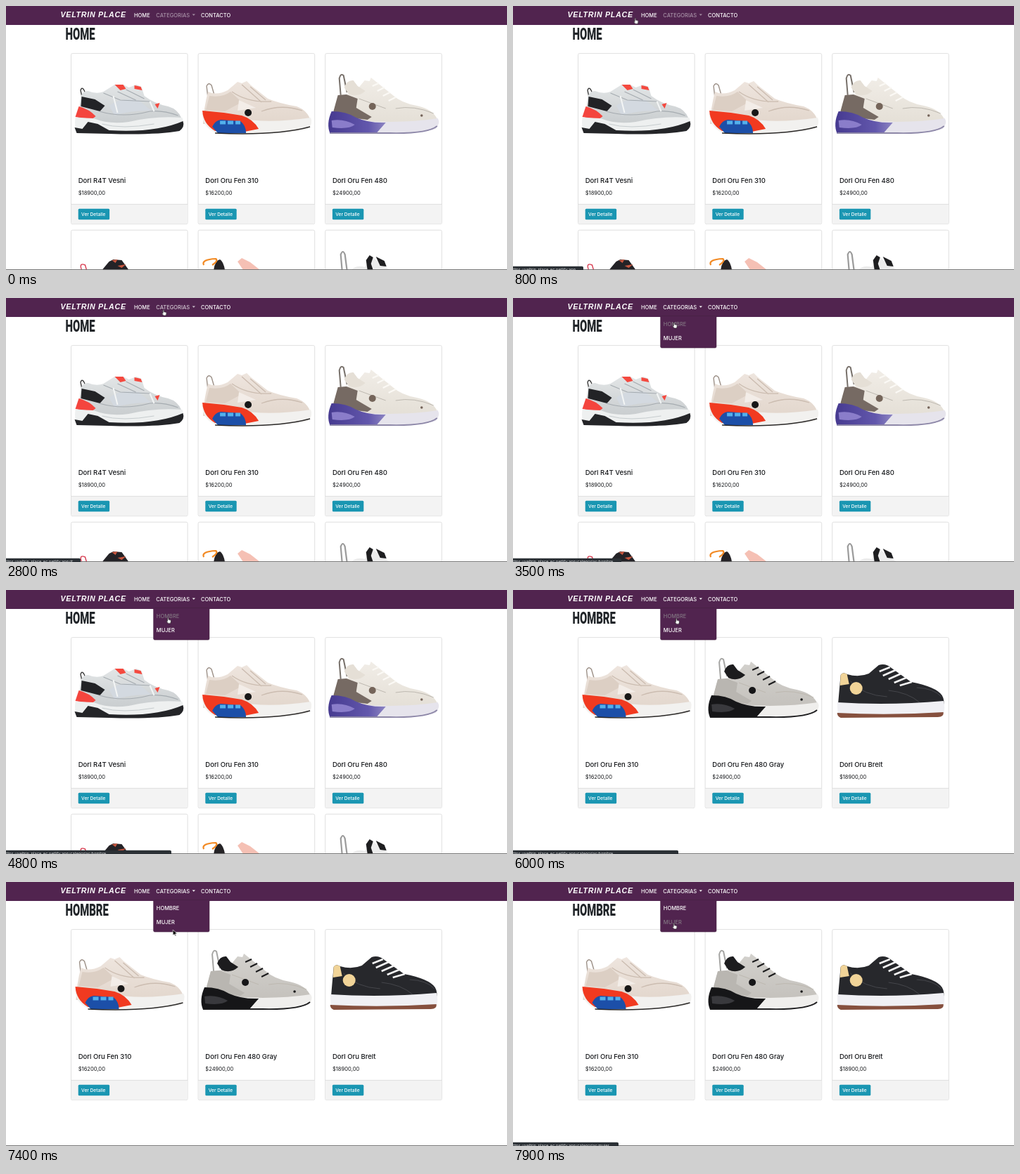
Write an HTML page that moves like this. It is 712 px wide and 376 px high and loops after 8 s.

```html
<!DOCTYPE html>
<html lang="es">
<head>
<meta charset="utf-8">
<title>Veltrin Place</title>
<style>
html, body { margin: 0; width: 100%; height: 100%; overflow: hidden; background: #fff; }
svg { display: block; width: 712px; height: 376px; }
text { font: 7.6px Inter, "Open Sans", sans-serif; fill: #15171a; }

/* page */
.nav text { fill: #fff; font-weight: 500; font-size: 7.5px; }
.nav .brand { font: italic 700 10.7px "Liberation Sans", Arial, sans-serif; letter-spacing: .7px; }
.heading { font: 900 24px Roboto, sans-serif; fill: #212529; transform: translate(84.5px, 48.2px) scaleX(.62); }
.title { font-size: 9.5px; font-weight: 500; }
.button { font-size: 6.6px; font-weight: 500; fill: #fff; }
.card { fill: #fff; stroke: #d9d9d9; stroke-width: .8; }
.url { font-size: 5.7px; fill: #d4d6d8; }
.bar { fill: #2b3035; }

/* every state shares one 8 s clock; 1.25% is 100 ms */
.run { animation: 8s step-end infinite; }
#home { animation-name: home; }
#men { animation-name: men; }
#categories { animation-name: categories; }
#menu { animation-name: menu; }
#hombre { animation-name: hombre; }
#mujer { animation-name: mujer; }
#cursor { animation-name: move; }
#hand { animation-name: hand; }
#arrow { animation-name: arrow; }
#url1 { animation-name: url1; }
#url2 { animation-name: url2; }
#url3 { animation-name: url3; }
#url4 { animation-name: url4; }
#grow { animation-name: grow; }

@keyframes home { 0% { opacity: 1 } 75%, 100% { opacity: 0 } }
@keyframes men { 0% { opacity: 0 } 75%, 100% { opacity: 1 } }
@keyframes categories {
  0% { fill-opacity: .5 } 28.75% { fill-opacity: .75 } 36.25%, 100% { fill-opacity: 1 }
}
@keyframes menu { 0% { opacity: 0 } 36.25%, 100% { opacity: 1 } }
@keyframes hombre { 0% { fill: #fff } 42.5% { fill: #827682 } 76.25%, 100% { fill: #fff } }
@keyframes mujer { 0% { fill: #fff } 93.75%, 100% { fill: #827682 } }
@keyframes move {
  0% { transform: translate(161px, 16.5px) }
  6.25% { transform: translate(167px, 16.5px) }
  10% { transform: translate(167px, 16.5px); animation-timing-function: steps(6, start) }
  17.5% { transform: translate(188px, 16px) }
  26.25% { transform: translate(188px, 16px); animation-timing-function: steps(5, start) }
  32.5% { transform: translate(220.5px, 16px) }
  40% { transform: translate(220.5px, 16px); animation-timing-function: steps(5, start) }
  46.25% { transform: translate(227px, 38.5px) }
  75% { transform: translate(229px, 39.5px) }
  76.25% { transform: translate(268px, 86px) }
  77.5% { transform: translate(314px, 134px) }
  83.75% { transform: translate(312px, 133px) }
  85% { transform: translate(308px, 128px) }
  86.25% { transform: translate(308px, 128px); animation-timing-function: steps(7, start) }
  95%, 100% { transform: translate(225.5px, 58px) }
}
@keyframes hand {
  0% { opacity: 0 } 5% { opacity: 1 } 76.25% { opacity: 0 } 93.75%, 100% { opacity: 1 }
}
@keyframes arrow { 0% { opacity: 0 } 76.25% { opacity: 1 } 93.75%, 100% { opacity: 0 } }
@keyframes url1 { 0% { opacity: 0 } 5% { opacity: .5 } 6.25% { opacity: 1 } 28.75%, 100% { opacity: 0 } }
@keyframes url2 { 0% { opacity: 0 } 28.75% { opacity: 1 } 42.5%, 100% { opacity: 0 } }
@keyframes url3 { 0% { opacity: 0 } 42.5% { opacity: 1 } 80% { opacity: .5 } 81.25%, 100% { opacity: 0 } }
@keyframes url4 { 0% { opacity: 0 } 97.5% { opacity: .5 } 98.75%, 100% { opacity: 1 } }
@keyframes grow { 0% { width: 156px } 58.75% { width: 196px } 60%, 100% { width: 237px } }
</style>
</head>
<body>
<svg viewBox="0 0 712 376">
<defs>
  <linearGradient id="silver" x2="0" y2="1"><stop stop-color="#e2e5e6"/><stop offset="1" stop-color="#c9cdcf"/></linearGradient>
  <linearGradient id="cream" x2="0" y2="1"><stop stop-color="#eee5de"/><stop offset="1" stop-color="#e2d6cc"/></linearGradient>
  <linearGradient id="ivory" x2="0" y2="1"><stop stop-color="#f1ede7"/><stop offset="1" stop-color="#e4dfd6"/></linearGradient>
  <linearGradient id="gray" x2="0" y2="1"><stop stop-color="#d3d1cd"/><stop offset="1" stop-color="#c4c1bc"/></linearGradient>
  <linearGradient id="violet"><stop stop-color="#463a90"/><stop offset=".7" stop-color="#6257ac"/><stop offset="1" stop-color="#8d85c2"/></linearGradient>

  <g id="chunky" fill="none">
    <path d="M16 132L13.500 120Q15 115 18 119L22 128" stroke="#333" stroke-width="1.3"/>
    <path d="M14 128Q17 121 24 121Q36 126 46 122L62 112L74 112L82 116L93 112L100 115L104 128Q118 139 138 143Q152 147 157 160L158 168L9 168Q12 144 14 128Z" fill="url(#silver)"/>
    <path d="M62 112L74 112L78 118L70 120ZM90 113L99 115L101 120L90 118ZM119 140L126 138L123 146Z" fill="#f4493f"/>
    <path d="M15 129L34 133L48 142L41 150L14 143Z" fill="#222326"/>
    <path d="M11 143Q26 147 35 157L30 161L6 158Z" fill="#f4453e"/>
    <path d="M54 142Q70 130 96 134L114 149Q86 148 62 156Z" fill="#d3d9e0"/>
    <path d="M46 124L70 134L112 136M66 122L92 134M78 119L104 132M40 150Q74 160 112 150Q130 148 152 156" stroke="#a5abb0" stroke-width="1.2"/>
    <path d="M60 128L66 152M112 136L118 150" stroke="#f3f5f5" stroke-width="2"/>
    <path d="M6 159L32 160Q54 169 82 165Q120 156 158 159Q162 169 154 176Q128 181 90 181L10 181Q4 174 6 159Z" fill="#eef0f0"/>
    <path d="M5 173L16 175L24 165L38 168L54 177Q120 181 159 164Q162 172 154 178Q120 184 54 182L8 181Z" fill="#242528"/>
    <path d="M44 168Q72 176 118 168" stroke="#c6ccce"/>
  </g>

  <g id="runner" fill="none">
    <path d="M14 132L12 114Q15 108 19 113L23 127" stroke="#9b8f86" stroke-width="1.4"/>
    <path d="M14 122Q26 128 42 120L56 108L62 110L69 107L75 113L99 132Q116 139 140 143Q156 149 160 164L158 170L7 168Q8 144 14 122Z" fill="url(#cream)"/>
    <path d="M16 128Q34 131 46 122L62 137L38 150L11 148Z" fill="#dccfc4"/>
    <path d="M48 122Q70 138 104 136M62 112L90 137M74 115L96 134M90 150Q118 139 148 149" stroke="#cbbcb0" stroke-width="1.3"/>
    <path d="M58 134L82 145L56 149Z" fill="#f3ede8"/>
    <path d="M6 153Q30 152 58 160Q100 168 160 159Q164 168 155 176Q120 182 70 181L24 180Q6 172 6 153Z" fill="#f2f1ef"/>
    <path d="M6 149Q34 151 62 156Q78 161 86 175L66 179L24 178Q7 168 6 149Z" fill="#f13a20"/>
    <path d="M20 172Q24 163 32 162L60 164Q68 170 68 181L28 181Z" fill="#1c4fa8"/>
    <path d="M31 166H60" stroke="#53b0ec" stroke-width="5" stroke-dasharray="8 3"/>
    <path d="M24 181Q112 185 159 172" stroke="#2a2827" stroke-width="1.6"/>
    <circle cx="71" cy="152" r="5" fill="#171717"/>
  </g>

  <g id="airy" fill="none">
    <path d="M22 127L20 103Q22 95 26 99L31 123" stroke="var(--loop)" stroke-width="2"/>
    <path d="M18 127Q30 127 42 123L56 106L63 107L65 102L70 106L96 127Q108 138 130 142Q154 147 160 163L158 169L10 166Q13 144 18 127Z" fill="var(--body)"/>
    <path d="M27 116Q31 105 40 106L46 114L57 121Q46 131 33 125Z" fill="var(--collar)"/>
    <path d="M18 127L30 126L46 132L44 145L66 158L60 162L10 156Z" fill="var(--heel)"/>
    <path d="M67 114L76 110M74 121L84 116M82 128L92 123M90 135L100 130" stroke="var(--lace)" stroke-width="2"/>
    <path d="M100 146Q126 141 154 153M48 132L86 146" stroke="#bdb8b0"/>
    <path d="M46 163Q108 168 160 160Q164 167 157 175Q140 181 62 181Z" fill="var(--sole)"/>
    <path d="M9 150Q30 150 44 159Q62 167 86 166L72 182H7Q1 168 9 150Z" fill="var(--air)"/>
    <path d="M9 163Q26 160 42 169Q34 176 10 173Z" fill="var(--shine)"/>
    <path d="M7 181H92Q146 182 159 171" stroke="var(--out)" stroke-width="1.8"/>
    <circle cx="67" cy="143" r="5" fill="var(--mark)"/>
    <circle cx="137" cy="156" r="1.8" fill="var(--mark)"/>
  </g>

  <g id="court" fill="none">
    <path d="M12 121Q15 116 21 120Q38 125 52 119L66 107Q76 104 84 111L112 131Q148 138 156 150Q160 157 158 166L8 166Q10 142 12 121Z" fill="#27282c"/>
    <path d="M12 121Q15 116 21 120L24 134L11 136Z" fill="#f1d498"/>
    <path d="M26 130Q44 150 78 152M80 143Q108 146 124 160M120 139Q144 140 155 152" stroke="#45464b"/>
    <path d="M67 116L82 110M72 122L90 114M80 127L98 119M88 132L105 125M96 136L113 131" stroke="#f4f4f4" stroke-width="2.6"/>
    <path d="M7 160Q80 165 158 158Q161 168 158 176L8 178Z" fill="#f0f0f4"/>
    <path d="M7 175Q80 179 158 174Q159 181 150 181L12 182Q7 180 7 175Z" fill="#86503e"/>
    <circle cx="34" cy="140" r="9" fill="#f1d498"/>
  </g>

  <g id="peek1" fill="none">
    <path d="M15 376Q11 365 20 369L22 376" stroke="#d83b50" stroke-width="1.4"/>
    <path d="M44 376L54 364L60 361L72 362L82 376Z" fill="#242327"/>
    <path d="M58 362L66 361L63 366ZM66 370L78 368L72 373Z" fill="#c9573f"/>
  </g>
  <g id="peek2" fill="none">
    <path d="M22 376Q24 362 31 361Q36 364 38 376Z" fill="#252326"/>
    <path d="M8 369Q4 361 25 360Q29 363 20 369" stroke="#f28a24" stroke-width="2.2"/>
    <path d="M56 364L62 359L74 365L88 376H64Z" fill="#f5c0b4"/>
  </g>
  <g id="peek3" fill="none">
    <path d="M24 377L22 354Q25 346 28 354L31 377" stroke="#9b9b9b" stroke-width="2.2"/>
    <path d="M36 376Q46 368 56 372L66 357L92 376Z" fill="#ececec"/>
    <path d="M58 362L63 355L68 358L65 367L68 376H60ZM72 357L84 363L87 371L78 370Z" fill="#1e1e20"/>
  </g>
</defs>

<rect width="712" height="376" fill="#fff"/>
<g id="home" class="run"><text class="heading">HOME</text></g>
<g id="men" class="run"><text class="heading">HOMBRE</text></g>

<g class="nav">
  <rect width="712" height="27" fill="#51244f"/>
  <text class="brand" x="77.5" y="16.2">VELTRIN PLACE</text>
  <text x="182" y="15.600">HOME</text>
  <g id="categories" class="run" fill="#fff">
    <text x="213.300" y="15.600">CATEGORIAS</text>
    <path d="M264.600 11.400h4.400l-2.200 2.300z"/>
  </g>
  <text x="277" y="15.600">CONTACTO</text>
  <g id="menu" class="run">
    <rect x="209.600" y="25.500" width="79.400" height="45.600" rx="1.800" fill="#51244f" stroke="#43203f" stroke-width=".5"/>
    <text id="hombre" class="run" x="213.800" y="40">HOMBRE</text>
    <text id="mujer" class="run" x="213.800" y="60.200">MUJER</text>
  </g>
</g>

<rect y="375" width="712" height="1" fill="#777"/>
<g id="url1" class="run">
  <rect class="bar" x="-2" y="370.8" width="102" height="8" rx="2"/>
  <text class="url" x="-3" y="378.2">https://veltrin-place-ec.netlify.app</text>
</g>
<g id="url2" class="run">
  <rect class="bar" x="-2" y="370.8" width="108" height="8" rx="2"/>
  <text class="url" x="-3" y="378.2">https://veltrin-place-ec.netlify.app/#</text>
</g>
<g id="url3" class="run">
  <rect id="grow" class="bar run" x="-2" y="370.8" width="156" height="8" rx="2"/>
  <text class="url" x="-3" y="378.2">https://veltrin-place-ec.netlify.app/categorias/hombre</text>
</g>
<g id="url4" class="run">
  <rect class="bar" x="-2" y="370.8" width="152" height="8" rx="2"/>
  <text class="url" x="-3" y="378.2">https://veltrin-place-ec.netlify.app/categorias/mujer</text>
</g>

<g id="cursor" class="run" stroke-width=".6" stroke-linejoin="round">
  <path id="hand" class="run" d="M2.5 6V1.2Q3.2 .2 3.9 1.2V3.7L6.6 4.2Q7.6 4.5 7.5 5.8L6.8 9H3.4L1 6Q1.2 4.8 2.5 6Z" fill="#fff" stroke="#111"/>
  <path id="arrow" class="run" d="M0 0V8L1.9 6.3L3.2 9L4.4 8.5L3.2 5.8H5.8Z" fill="#000" stroke="#fff"/>
</g>
</svg>

<script>
const purple = "--loop:#77706a;--body:url(#ivory);--collar:#e5dfd6;--heel:#766a63;--lace:#fbf9f5;--sole:#e6e4ec;--air:url(#violet);--shine:#8a7dca;--out:#8d87a8;--mark:#75655a";
const black = "--loop:#a5a5a3;--body:url(#gray);--collar:#1c1c1e;--heel:#b9b6b1;--lace:#1c1c1e;--sole:#efeeec;--air:#161618;--shine:#39393d;--out:#1b1b1d;--mark:#161618";

const columnX = i => 92.5 + i * 180.6;

const card = ([shoe, title, price, tones = ""], i) => `
  <g transform="translate(${columnX(i)})">
    <rect class="card" y="67.6" width="165.6" height="243" rx="2"/>
    <path d="M.4 282.4H165.2V308.5Q165.2 310.2 163.4 310.2H2.2Q.4 310.2 .4 308.5Z" fill="#f3f3f3"/>
    <path d="M0 282.4H165.6" stroke="#d9d9d9" stroke-width=".8"/>
    <use href="#${shoe}" style="${tones}"/>
    <text class="title" x="10.2" y="251.5">${title}</text>
    <text x="10.2" y="269">$${price},00</text>
    <rect x="10.2" y="288.8" width="44.4" height="15.4" rx="1.5" fill="#1a96b2"/>
    <text class="button" x="14.6" y="299">Ver Detalle</text>
  </g>`;

const peek = i => `
  <g transform="translate(${columnX(i)})">
    <rect class="card" y="319.2" width="165.6" height="70" rx="2"/>
    <use href="#peek${i + 1}"/>
  </g>`;

const fill = (id, markup) => document.getElementById(id).insertAdjacentHTML("beforeend", markup);

fill("home", [
  ["chunky", "Dorl R4T Vesni", 18900],
  ["runner", "Dorl Oru Fen 310", 16200],
  ["airy", "Dorl Oru Fen 480", 24900, purple]
].map(card).join("") + [0, 1, 2].map(peek).join(""));

fill("men", [
  ["runner", "Dorl Oru Fen 310", 16200],
  ["airy", "Dorl Oru Fen 480 Gray", 24900, black],
  ["court", "Dorl Oru Brelt", 18900]
].map(card).join(""));
</script>
</body>
</html>
```
